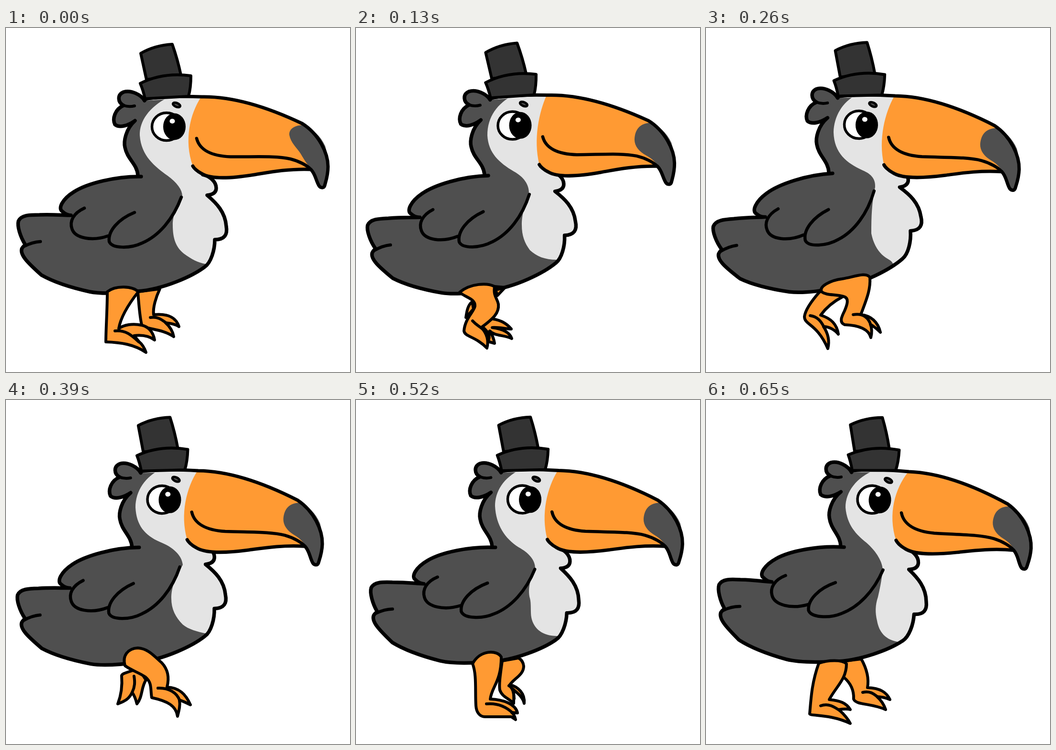
An HTML page with a canvas that plays this animation: 720x720 px, repeating every 0.78 s.

```html
<!DOCTYPE html>
<html lang="en">
<head>
<meta charset="utf-8">
<title>Walking toucan</title>
<style>
html, body { margin: 0; width: 100%; height: 100%; overflow: hidden; background: #fff; }
canvas { display: block; width: 720px; height: 720px; }
</style>
</head>
<body>
<canvas id="stage" width="720" height="720"></canvas>
<script>
const ctx = document.getElementById('stage').getContext('2d');
const GREY = '#4f4f4f', PALE = '#e4e4e4', ORANGE = '#ff9a33', HAT = '#333';
const STEP = 130;

// head, body: [shift x, shift y, turn in degrees]; cheek and brow: small sideways offsets
const poses = [
  {
    head: [0, 0, 0], body: [0, 0, 0], cheek: 0, brow: 0,
    patch: 'M338 146C300 165 279 195 280 225C283 268 312 290 338 309C358 324 369 338 369 352C354 380 349 395 349 412C349 440 355 458 372 472C388 484 402 491 418 494',
    far: 'M276 552C278 580 280 605 284 621C292 632 325 628 351 646C349 634 342 624 334 617C345 618 355 620 362 625C356 606 340 597 309 600C307 585 314 563 322 546Z',
    farToe: 'M302 606C318 603 328 612 336 618',
    near: 'M212 552C212 590 209 630 209 657C240 658 268 662 293 679C289 667 284 661 278 656L268 644C285 642 300 645 311 653C308 636 298 625 284 622C265 618 247 621 236 629C240 605 255 580 277 552C265 540 230 538 212 552Z',
    nearToe: 'M228 634C250 632 262 642 278 657'
  },
  {
    head: [-8.5, -2.5, -0.8], body: [-0.5, -1.5, -2.5], cheek: 7, brow: 3,
    patch: 'M330 140C296 158 275 185 275 225C277 262 300 282 330 300C352 312 362 328 362 345C352 375 347 392 347 412C347 435 353 450 364 465C378 478 395 485 420 485',
    far: 'M262 622C270 632 285 640 276 656L290 660C288 648 284 640 280 634C290 645 310 642 326 650C322 637 308 630 285 627C300 626 315 630 325 630C312 614 295 609 278 608ZM312 543L296 560L290 541ZM243 573C234 580 232 592 230 606L246 588Z',
    farToe: '',
    near: 'M217 553C228 564 250 566 249 582C247 594 228 608 226 634C228 647 250 645 274 670C278 656 275 640 262 627C288 608 300 596 298 578C296 566 287 562 290 541C275 533 240 534 217 553Z',
    nearToe: 'M244 613C252 622 258 624 265 630'
  },
  {
    head: [-16, -4, 1.7], body: [-9, -6, -4.1], cheek: 5, brow: 7,
    patch: 'M316 139C285 155 268 185 267 218C268 262 295 283 328 298C347 306 355 317 354 333C347 365 346 395 346 430C350 450 358 464 368 474C378 484 388 485 391 493',
    far: 'M238 552C222 570 208 590 206 604C206 622 232 618 255 671C259 655 256 640 246 625C258 625 270 632 277 641C274 620 262 608 240 601C248 590 262 575 285 563L270 552Z',
    farToe: 'M218 602C232 604 240 612 247 626',
    near: 'M242 552C236 540 262 528 285 525C310 521 335 510 343 522C345 548 335 570 324 600C345 602 360 615 365 637C358 630 352 625 344 620C348 630 347 640 345 648C340 628 315 622 290 621C278 616 284 604 290 592C296 578 300 565 288 562C270 557 252 560 242 552Z',
    nearToe: 'M308 600C330 596 341 608 345 622'
  },
  {
    head: [-9.5, 2, 1.6], body: [-1, -2, -1.5], cheek: 2, brow: 7,
    patch: 'M324 145C292 160 271 190 271 225C273 262 290 283 322 297C350 308 368 325 370 345C352 375 346 395 346 415C346 438 355 455 370 470C382 480 400 485 420 489',
    far: 'M268 565C255 570 243 572 242 577C244 600 241 618 234 636C250 630 258 625 264 612C270 620 272 628 274 636C286 622 283 600 293 586L280 566Z',
    farToe: 'M264 612C270 600 270 590 268 578',
    near: 'M249 556C243 535 255 520 276 519C298 520 312 538 326 550C340 565 342 582 337 601C362 602 376 615 386 638C378 634 370 630 363 628C365 640 362 650 359 662C356 640 338 630 305 623C302 605 306 592 292 580C278 570 262 566 249 556Z',
    nearToe: 'M318 603C340 602 358 612 364 630'
  },
  {
    head: [12, 1.5, 1.7], body: [4.5, -3, 1.9], cheek: 3, brow: 7,
    patch: 'M345 145C308 163 291 192 291 222C293 262 312 290 340 308C362 320 375 335 375 352C362 380 360 400 364 415C367 425 365 445 367 455C372 480 392 495 424 494',
    far: 'M306 546C302 575 299 595 301 607C306 622 320 624 330 635C330 622 332 612 327 604C339 614 349 622 352 635C354 615 340 600 322 596C332 582 351 575 351 557C350 548 346 543 340 540Z',
    farToe: 'M320 598C328 602 330 612 331 625',
    near: 'M244 552C253 575 249 610 251 640C252 655 260 663 270 663L325 663L334 669C332 661 330 657 326 654L338 655C334 636 308 627 281 626C284 600 304 590 304 538C296 523 260 522 244 552Z',
    nearToe: 'M273 636C295 634 312 640 328 655'
  },
  {
    head: [11.5, 2, 3.2], body: [-1, -4, 3.2], cheek: -2, brow: 11,
    patch: 'M354 146C315 162 292 192 292 225C295 262 315 282 335 298C358 318 370 340 370 357C366 385 364 395 360 412C354 430 354 445 358 462C362 485 375 503 406 507',
    far: 'M288 580C300 590 310 605 309 626C314 639 345 634 376 648C372 636 366 628 358 621C368 621 378 624 385 627C378 612 365 603 338 602C342 580 335 560 325 542L292 546Z',
    farToe: 'M328 612C344 608 352 616 360 622',
    near: 'M236 551C222 590 220 620 217 657C220 662 260 657 302 677C296 665 288 657 278 648C290 646 296 646 302 648C294 634 280 629 258 627C272 600 294 585 294 552C285 543 255 544 236 551Z',
    nearToe: 'M240 640C256 634 268 642 280 650'
  }
];

const torso = 'M412 307C427 310 440 322 440 335C440 345 432 349 421 350C440 366 459 385 461 415C464 432 458 443 437 443C437 465 429 491 416 500C391 519 330 547 275 551C240 555 200 557 175 552C130 542 95 529 74 517C45 491 29 475 33 462C36 456 40 455 40 453C30 437 23 415 26 404C32 391 50 391 70 391C100 390 120 392 136 392';
const wingTop = 'C130 392 124 390 118 384C108 378 118 358 142 343C170 325 230 310 283 311';
const feathers = 'M164 377C140 388 133 405 138 420C144 440 180 447 214 435M269 386C235 400 213 425 216 447C222 462 260 462 285 450C320 435 350 400 367 354M38 457Q55 448 72 447';

const nape = 'M290 152C283 140 262 129 246 134C232 140 234 156 246 162C228 170 222 190 228 202C238 210 256 204 270 194C250 212 246 238 249 250C254 275 274 284 276 308';
const beakLine = 'C470 143 540 162 620 200C655 222 674 262 674 290C674 310 668 325 667 330C665 336 658 335 655 330C648 318 648 306 638 296C590 294 545 303 520 307C470 315 430 317 410 305C400 300 393 293 391 289';
const tipEdge = 'C642 212 658 225 668 247C675 272 677 295 668 328C667 333 664 336 659 334C652 328 652 306 640 296';
const tipBulbs = [
  'C628 284 620 268 616 262C608 250 596 240 593 224C592 212 603 203 624 203Z',
  'C632 284 624 278 615 273C600 265 591 253 591 240C592 218 603 206 624 205Z'
];

function fill(d, color) {
  ctx.fillStyle = color;
  ctx.fill(new Path2D(d));
}

function line(d, width = 6) {
  ctx.lineWidth = width;
  ctx.stroke(new Path2D(d));
}

function shape(d, color) {
  fill(d, color);
  line(d);
}

function oval(x, y, rx, ry, color, turn = 0) {
  ctx.beginPath();
  ctx.ellipse(x, y, rx, ry, turn, 0, 7);
  ctx.fillStyle = color;
  ctx.fill();
}

function place([dx, dy, turn], px, py, paint) {
  ctx.save();
  ctx.translate(px + dx, py + dy);
  ctx.rotate(turn * Math.PI / 180);
  ctx.translate(-px, -py);
  paint();
  ctx.restore();
}

function drawHead({ cheek, brow }, bulb) {
  line(nape, 7.5);
  line('M246 162Q257 166 269 163');

  // beak
  fill('M410 144' + beakLine + `C${372 + cheek} 235 ${385 + cheek} 180 408 145Z`, ORANGE);
  fill('M624 203' + tipEdge + bulb, GREY);
  line('M291 149C330 142 380 143 410 144' + beakLine, 7);
  line('M399 231C405 255 430 268 470 269.5C520 270 565 267 595 274C615 279 630 288 637 295', 6.5);

  // hat
  shape('M282 53Q312 36 348 34Q359 65 366 98L294 108Z', HAT);
  shape('M281 116C315 99 350 95 387 100Q387 125 382 143L291 148Q287 130 281 116Z', HAT);

  // eye and brow
  oval(336, 206.5, 30.5, 29, '#fff');
  ctx.lineWidth = 5.5;
  ctx.stroke();
  oval(352.5, 206.5, 23.5, 28, '#000');
  oval(348, 195, 5.5, 5, '#fff');
  oval(357 + brow, 161 + brow / 3, 8, 4, GREY, 0.4);
  ctx.lineWidth = 5;
  ctx.stroke();
}

function draw(pose, index) {
  const onBody = paint => place(pose.body, 267, 437.5, paint);
  const onHead = paint => place(pose.head, 340, 207, paint);
  ctx.clearRect(0, 0, 720, 720);

  onBody(() => fill(torso + wingTop + 'L340 315L380 290Z', GREY));
  onHead(() => fill(nape + 'L345 330L395 292L420 200L410 145Z', GREY));

  // the pale patch stays inside the silhouette
  ctx.globalCompositeOperation = 'source-atop';
  fill(pose.patch + 'L480 470V140Z', PALE);
  ctx.globalCompositeOperation = 'source-over';

  shape(pose.far, ORANGE);
  line(pose.farToe);
  onBody(() => {
    line(torso + wingTop, 7.5);
    line(feathers, 6.5);
  });
  shape(pose.near, ORANGE);
  line(pose.nearToe);
  onHead(() => drawHead(pose, tipBulbs[index ? 1 : 0]));
}

ctx.lineCap = ctx.lineJoin = 'round';
let shown = -1;

function tick() {
  const index = Math.floor(performance.now() / STEP) % poses.length;
  if (index !== shown) draw(poses[shown = index], index);
  requestAnimationFrame(tick);
}
tick();
</script>
</body>
</html>
```
